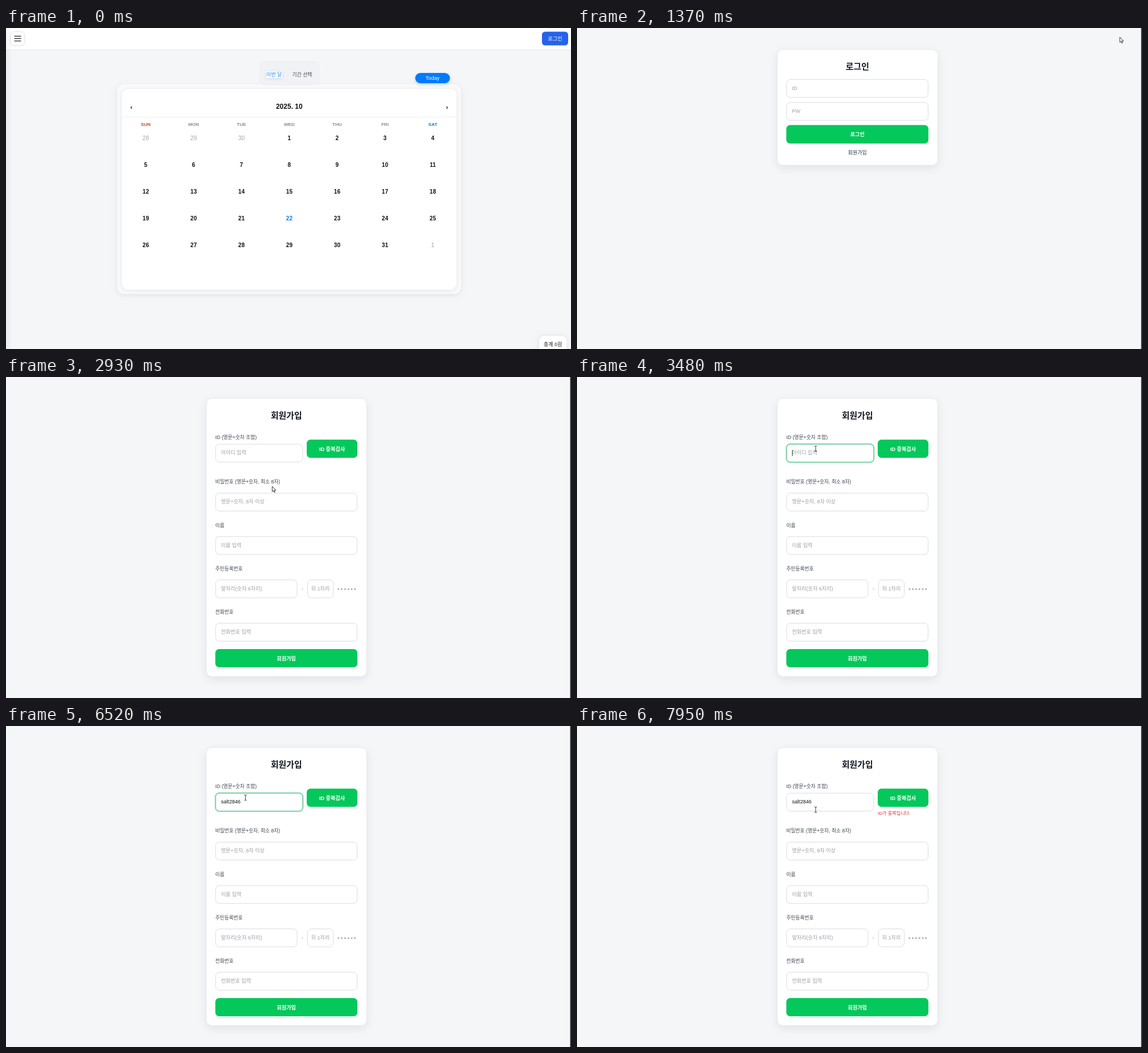
These frames come from a looping animation (992x564 px, 8 s). An HTML page with a canvas:

```html
<!DOCTYPE html>
<html lang="ko">
<head>
<meta charset="utf-8">
<style>
html, body { margin: 0; width: 100%; height: 100%; overflow: hidden; background: #f4f6f8; }
canvas { display: block; width: 992px; height: 564px; }
</style>
</head>
<body>
<canvas id="stage" width="992" height="564"></canvas>
<script>
const ctx = document.getElementById('stage').getContext('2d');
const LOOP = 8000;
const FONT = '"Liberation Sans", "Noto Sans CJK KR", "Noto Sans CJK", sans-serif';
const GREEN = '#04c85b', HINT = '#9b9fa6', LABEL = '#3a434f';
const BODY = 9.09;
const USER = 'salt2846';

// [time, x, y] of the pointer
const PATH = [
  [140, 660, 457], [820, 957, 35], [950, 957, 35], [1110, 953, 16], [1400, 953, 16],
  [1710, 606, 106], [1750, 606, 106], [2400, 487, 219], [2860, 487, 219], [3060, 419, 126],
  [6500, 419, 126], [6840, 545, 107], [7160, 545, 107], [7290, 556, 122],
  [7500, 556, 122], [7950, 419, 147]
];
const CLICKS = [[1130, 1250], [2670, 2860], [3280, 3420], [6900, 7030], [7360, 7490]];
// [time, number of typed letters]
const TYPING = [
  [0, 0], [4010, 2], [4210, 4], [4470, 1], [4600, 0], [4740, 1], [4800, 2],
  [5000, 3], [5130, 4], [5660, 5], [5790, 6], [5860, 7], [5990, 8]
];
const LOGIN_AT = 1240, JOIN_AT = 2860, FOCUS_AT = 3410, BLUR_AT = 6900, ERROR_AT = 7550;

let zones = [];

function text(str, x, y, size, color, weight = 400, align = 'center') {
  ctx.font = `${weight} ${size}px ${FONT}`;
  ctx.textAlign = align;
  ctx.fillStyle = color;
  ctx.fillText(str, x, y + size * 0.36);
}

function box(x, y, w, h, r, fill, stroke, shadow) {
  ctx.save();
  ctx.beginPath();
  ctx.roundRect(x, y, w, h, r);
  if (shadow) {
    ctx.shadowOffsetY = shadow[0];
    ctx.shadowBlur = shadow[1];
    ctx.shadowColor = shadow[2];
  }
  ctx.fillStyle = fill;
  ctx.fill();
  ctx.restore();
  if (stroke) {
    ctx.lineWidth = 0.9;
    ctx.strokeStyle = stroke;
    ctx.beginPath();
    ctx.roundRect(x, y, w, h, r);
    ctx.stroke();
  }
}

function line(x, y, w, h, color) {
  ctx.fillStyle = color;
  ctx.fillRect(x, y, w, h);
}

function zone(x, y, w, h, kind) {
  zones.push({ x, y, w, h, kind });
}

function button(x, y, w, h, label) {
  box(x, y, w, h, 6.5, GREEN);
  text(label, x + w / 2, y + h / 2 + 0.4, BODY, '#fff', 700);
  zone(x, y, w, h, 'hand');
}

function input(x, y, w, hint, pad = 10) {
  box(x + 0.5, y + 0.5, w - 1, 31.5, 6.5, '#fff', '#d5d9df');
  text(hint, x + pad, y + 15.6, BODY, HINT, 400, 'left');
  zone(x, y, w, 32, 'beam');
}

function background() {
  line(0, 0, 992, 564, '#f4f6f8');
}

function calendarPage() {
  background();
  const edge = ctx.createLinearGradient(0, 0, 12, 0);
  edge.addColorStop(0, 'rgba(0,0,0,.045)');
  edge.addColorStop(1, 'rgba(0,0,0,0)');

  line(0, 0, 992, 38, '#fff');
  line(0, 38, 992, 1, '#e6e8eb');
  box(7.5, 6.5, 25.5, 24.5, 6.5, '#fff', '#d9dce1');
  for (let i = 0; i < 3; i++) line(14.5, 13.8 + i * 4.2, 12, 1.2, '#1a1a1a');
  box(941, 6.5, 46, 24, 5.5, '#2563eb');
  text('로그인', 964, 18.8, BODY, '#fff', 500);
  zone(941, 6, 46, 25, 'hand');

  box(195, 98.5, 604, 369, 13, '#fafafa', null, [2, 9, 'rgba(0,0,0,.08)']);
  box(446, 59, 103.5, 40.5, 7, '#f1f2f5', '#e9ebef');
  box(457, 76, 28, 12, 1.5, '#fff', null, [1, 4, 'rgba(0,0,0,.12)']);
  text('이번 달', 470.8, 82, 8.9, '#1a8cff', 500);
  text('기간 선택', 520, 82, 8.8, '#454a55', 500);

  box(203.5, 107, 587.5, 353, 11, '#fff', null, [1, 6, 'rgba(0,0,0,.09)']);
  box(718.5, 79, 61, 18, 9, '#007aff', null, [2, 5, 'rgba(0,122,255,.3)']);
  text('Today', 749, 88, 9.1, '#fff');

  text('‹', 220.2, 138.6, 11, '#111', 700);
  text('›', 774.3, 138.6, 11, '#111', 700);
  text('2025. 10', 497.3, 138, 12, '#111', 700);
  line(203.5, 156, 587.5, 1, '#eef0f2');

  const days = ['SUN', 'MON', 'TUE', 'WED', 'THU', 'FRI', 'SAT'];
  days.forEach((day, i) => {
    const color = i === 0 ? '#bf4a1c' : i === 6 ? '#0a76e8' : '#8a8a8e';
    text(day, 245.4 + i * 84, 169, 8.1, color, 700);
  });
  for (let i = 0; i < 35; i++) {
    const n = i - 2;
    const out = n < 1 || n > 31;
    const label = n < 1 ? n + 30 : n > 31 ? n - 31 : n;
    const color = out ? '#a3a3a6' : n === 22 ? '#0a7aea' : '#111';
    text(label, 245.4 + (i % 7) * 84, 193.2 + Math.floor(i / 7) * 47.1, 10, color, out ? 400 : 700);
  }

  box(936, 541, 48.5, 40, 9, '#fff', null, [1, 8, 'rgba(0,0,0,.1)']);
  text('총계 0원', 960.2, 555.6, 9, '#6a6a6a', 700);
  line(0, 0, 12, 564, edge);
}

function card(h, title) {
  background();
  line(990.6, 0, 1.4, 564, '#1c1d1f');
  box(352, 38, 281, h, 9, '#fff', '#e9ebee', [5, 17, 'rgba(15,23,42,.09)']);
  text(title, 492.3, 67.8, 14.9, '#101623', 800);
}

function loginPage(pos) {
  card(203, '로그인');
  input(367.5, 90, 249.5, 'ID');
  input(367.5, 130.2, 249.5, 'PW');
  button(367.5, 170.5, 249.5, 32.5, '로그인');
  text('회원가입', 492.3, 219, 8.95, '#22384a');
  zone(476, 213, 33, 12, 'hand');
  if (hit(pos) === zones[zones.length - 1]) line(476, 222.6, 32.5, 0.8, '#22384a');
}

function lastBefore(list, t) {
  return list.reduce((found, item) => (item[0] <= t ? item : found), list[0]);
}

function idField(t) {
  const [since, count] = lastBefore(TYPING, t);
  const typed = USER.slice(0, count);
  const focus = t >= FOCUS_AT && t < BLUR_AT;
  if (focus) box(366, 116, 157, 35.5, 8, 'rgba(4,200,91,.2)');
  input(367.5, 117.5, 154, typed ? '' : '아이디 입력');
  if (focus) box(368, 118, 153, 31.5, 6.5, 'rgba(0,0,0,0)', '#2db573');
  text(typed, 377.5, 133.1, BODY, '#151515', 400, 'left');
  const width = ctx.measureText(typed).width;
  const age = t - Math.max(since, FOCUS_AT);
  const wait = count ? 530 : 400;
  if (focus && age < wait) line(377.7 + width, 128, 0.9, 11, '#111');
}

function joinPage(t) {
  card(488, '회원가입');
  const label = (str, y) => text(str, 367.5, y, 8.72, LABEL, 400, 'left');
  label('ID (영문+숫자 조합)', 106);
  label('비밀번호 (영문+숫자, 최소 8자)', 184.2);
  label('이름', 260.4);
  label('주민등록번호', 336.5);
  label('전화번호', 412.8);

  idField(t);
  button(528, 110, 89, 32, 'ID 중복검사');
  input(367.5, 203.5, 249.5, '영문+숫자, 8자 이상');
  input(367.5, 279.8, 249.5, '이름 입력');
  input(367.5, 356, 144, '앞자리(숫자 6자리)');
  text('-', 520.5, 372.2, BODY, '#888');
  input(529, 356, 46, '뒤 1자리', 6.7);
  ctx.letterSpacing = '2.27px';
  text('******', 582, 374, BODY, '#6f737b', 400, 'left');
  ctx.letterSpacing = '0px';
  input(367.5, 432.2, 249.5, '전화번호 입력');
  button(367.5, 478, 249.5, 32, '회원가입');
  if (t >= ERROR_AT) text('ID가 중복입니다.', 528, 152.8, 8.1, '#e03131', 500, 'left');
}

function pointerAt(t) {
  let i = 0;
  while (i < PATH.length - 2 && t >= PATH[i + 1][0]) i++;
  const [t0, x0, y0] = PATH[i], [t1, x1, y1] = PATH[i + 1];
  const k = Math.min(1, Math.max(0, (t - t0) / (t1 - t0)));
  const e = k * k * (3 - 2 * k);
  return { x: x0 + (x1 - x0) * e, y: y0 + (y1 - y0) * e };
}

function hit(p) {
  return zones.find(z => p.x >= z.x && p.x <= z.x + z.w && p.y >= z.y && p.y <= z.y + z.h);
}

const ARROW = new Path2D('M0 0V9.2L2.1 7.3L3.6 10.6L5 10L3.6 6.8H6.6Z');
const HAND = new Path2D('M-.9 1Q0-.3.9 1V4.2Q2 3.5 2.7 4.6Q3.7 4 4.3 5.1Q5.4 4.8 5.4 6.2V8.6L4.3 11.4H-.5L-3 7.6Q-3.4 6.2-2 6.4L-.9 7.4Z');
const BEAM = new Path2D('M-2.2-4.6H-.5L0-4.2L.5-4.6H2.2M0-4.2V4.2M-2.2 4.6H-.5L0 4.2L.5 4.6H2.2');

function drawPointer(p, t) {
  const target = hit(p);
  const kind = target ? target.kind : 'arrow';
  if (CLICKS.some(([a, b]) => t >= a && t < b)) {
    ctx.fillStyle = 'rgba(250,238,20,.65)';
    ctx.beginPath();
    ctx.arc(p.x, p.y - 0.6, 8.2, 0, Math.PI * 2);
    ctx.fill();
  }
  ctx.save();
  ctx.translate(p.x, p.y);
  ctx.lineJoin = 'round';
  ctx.lineWidth = 0.9;
  ctx.strokeStyle = '#222';
  if (kind === 'beam') {
    ctx.stroke(BEAM);
  } else {
    const shape = kind === 'hand' ? HAND : ARROW;
    ctx.fillStyle = '#fff';
    ctx.fill(shape);
    ctx.stroke(shape);
  }
  ctx.restore();
}

function render(t) {
  const pos = pointerAt(t);
  zones = [];
  if (t < LOGIN_AT) calendarPage();
  else if (t < JOIN_AT) loginPage(pos);
  else joinPage(t);
  if (t >= 140) drawPointer(pos, t);
}

const start = performance.now();
function tick() {
  render((performance.now() - start) % LOOP);
  requestAnimationFrame(tick);
}
tick();
</script>
</body>
</html>
```
